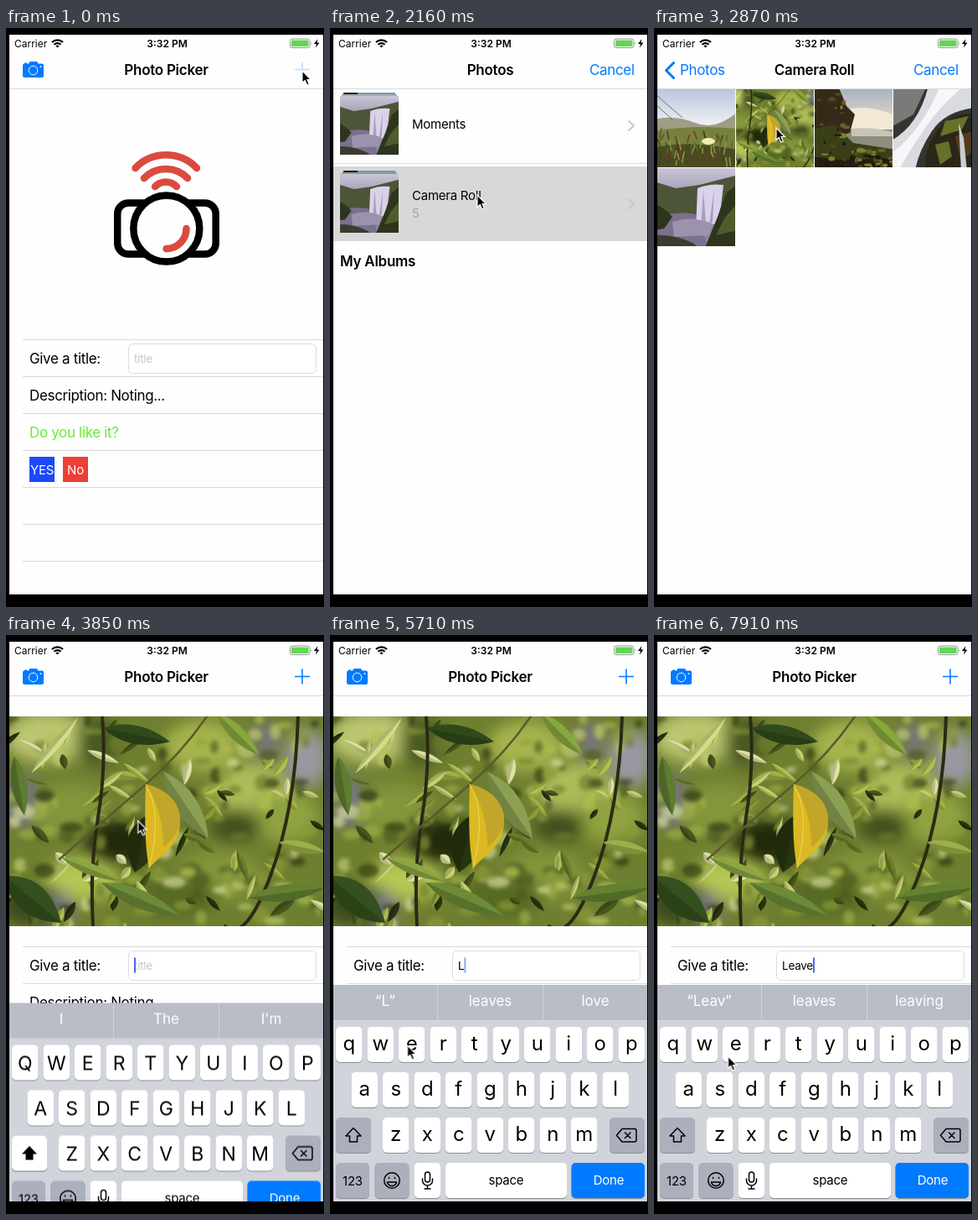
An HTML page for the animation above (8 s loop, 380 by 690 pixels).

```html
<!DOCTYPE html>
<html lang="en">
<head>
<meta charset="utf-8">
<title>Photo Picker</title>
<style>
html, body { margin: 0; width: 100%; height: 100%; overflow: hidden; background: #000; }
svg { display: block; }
text { font: 17px Inter, Roboto, sans-serif; letter-spacing: -.34px; }
.b { font-weight: 600; letter-spacing: -.27px; }
.s { font-size: 15px; letter-spacing: -.24px; }
.mid { text-anchor: middle; }
.blue { fill: #007aff; }
.line { stroke: #d9d9dc; }
.field { font-size: 13.5px; letter-spacing: -.25px; }
.status { font-size: 12px; letter-spacing: 0; }
.hint { fill: #fff; letter-spacing: 0; }
.key { font-size: 23px; letter-spacing: 0; }
.stroke { fill: none; stroke-linecap: round; stroke-linejoin: round; }
</style>
</head>
<body>
<svg width="380" height="690" viewBox="0 0 380 690">
  <defs>
    <clipPath id="screen"><path d="M4 8H379V675H4z"/></clipPath>
    <filter id="soft" x="-10%" y="-10%" width="120%" height="120%"><feGaussianBlur stdDeviation="9"/></filter>
    <filter id="blur" x="-10%" y="-10%" width="120%" height="120%"><feGaussianBlur stdDeviation="2.5"/></filter>
    <filter id="haze" x="-10%" y="-10%" width="120%" height="120%"><feGaussianBlur stdDeviation=".6"/></filter>
    <linearGradient id="sky" x2="0" y2="1"><stop stop-color="#b9c6dc"/><stop offset=".45" stop-color="#eef0f2"/></linearGradient>
    <linearGradient id="dusk" x2="0" y2="1"><stop stop-color="#c9c6d6"/><stop offset=".5" stop-color="#8d84a0"/></linearGradient>
    <linearGradient id="glow" x2="0" y2="1"><stop stop-color="#a9b3c4"/><stop offset=".5" stop-color="#f0dfc6"/></linearGradient>

    <g id="leafy"></g>
    <g id="dune">
      <path fill="url(#sky)" d="M0 0H93V93H0z"/>
      <g filter="url(#haze)">
        <path fill="#a09c86" d="M-4 36Q20 30 45 40T97 26V97H-4z"/>
        <path fill="#77803f" d="M-4 50Q40 42 97 47V97H-4z"/>
        <path fill="#4a4a22" d="M-4 70Q30 60 97 72V97H-4z"/>
      </g>
      <path stroke="#555" stroke-width=".8" d="M0 8L30 34M0 20L18 36"/>
      <g id="blades"></g>
      <ellipse cx="61" cy="62" rx="8" ry="4" fill="#f0efac"/>
    </g>
    <g id="coast">
      <path fill="url(#glow)" d="M0 0H93V93H0z"/>
      <g filter="url(#haze)">
        <path fill="#f3e8d6" d="M40 24Q62 18 93 30V52H46z"/>
        <path fill="#8f8c80" d="M38 48H97V74H30z"/>
        <path fill="#c9c3b4" d="M44 47Q70 44 97 52V56H44z"/>
        <path fill="#37291a" d="M-4-4H28L38 20 48 30 42 52-4 66z"/>
        <path fill="#3b3f18" d="M-4 48L24 42 46 64 97 72V97H-4z"/>
        <path fill="#241d12" d="M-4 80L30 84 97 82V97H-4z"/>
        <g id="moss"></g>
      </g>
    </g>
    <g id="rapids">
      <path fill="#36342f" d="M0 0H93V93H0z"/>
      <g filter="url(#haze)">
        <path fill="#7b7a78" d="M-4-4H40L24 30-4 46z"/>
        <path fill="#d9dbe0" d="M42-4H97V22Q62 26 46 50T26 97H-4V62Q30 44 42-4z"/>
        <path fill="#f7f7fa" d="M56-4H84Q56 20 38 46T6 97H-4V78Q34 50 56-4z"/>
        <path fill="#2a2718" d="M97 28Q64 30 50 52T38 97H97z"/>
        <path fill="#68702a" d="M62 38L90 32 82 48 56 56zM50 66l16-4 4 18-14 10z"/>
        <path fill="#513c20" d="M74 56l20-6v26l-14 8z"/>
        <path fill="#c9cdd4" d="M78 40l6 18 4 39h-7z"/>
      </g>
    </g>
    <g id="falls">
      <path fill="url(#dusk)" d="M0 0H93V93H0z"/>
      <g filter="url(#haze)">
        <path fill="#4d5538" d="M-4 16L22 24 50 20 97 8V50L60 60-4 66z"/>
        <path fill="#7b708d" d="M-4 58Q30 50 50 56L60 97H-4z"/>
        <path fill="#d9d2ea" d="M48 24Q62 18 79 20L76 46 70 66 46 72z"/>
        <path fill="#a99fbd" d="M55 26l3 40-6 4zM68 24l-2 40-4 3z"/>
        <path fill="#9c92ae" d="M18 64Q40 56 66 66L62 80 20 82z"/>
        <path fill="#2d351c" d="M97 18L82 30 72 58 56 97H97zM-4 42Q10 48 18 58L8 72-4 74z"/>
        <path fill="#4f5c2c" d="M97 40L80 60 70 80 97 74z"/>
        <path fill="#3c3b31" d="M-4 80Q20 78 44 90L50 97H-4z"/>
      </g>
    </g>
  </defs>

  <g clip-path="url(#screen)">
    <path fill="#fefefe" d="M4 8H379V675H4z"/>
    <g id="page">
      <path class="line" stroke="#c8c8cb" d="M4 72.5H379"/>
      <path class="blue" d="M22 42.500v-1h3v1h2l1.500-2.500h8.500l1.500 2.500H43q2 0 2 2V57q0 2-2 2H22q-2 0-2-2V44.500q0-2 2-2z"/>
      <circle cx="32.500" cy="50.500" r="5.300" fill="none" stroke="#fff"/>
      <circle cx="41.500" cy="46" r=".9" fill="#fff"/>
      <text class="b mid" x="191.500" y="56">Photo Picker</text>
      <path id="plus" stroke="#007aff" stroke-width="1.600" d="M345 49.500H363M354 40.500V58.500"/>
      <g id="art" class="stroke" stroke-width="8.500">
        <g stroke="#db4a3f">
          <path d="M154.500 167A51 51 0 0 1 228 167"/>
          <path d="M165 179A36 36 0 0 1 217 179"/>
          <path d="M178 189A18 18 0 0 1 204 189"/>
        </g>
        <rect x="133.200" y="208.500" width="117.500" height="61" rx="13" stroke="#000"/>
        <circle cx="191.800" cy="239" r="39.500" fill="#fefefe" stroke="#000"/>
        <path stroke="#db4a3f" d="M215.500 239A24 24 0 0 1 191.500 263"/>
      </g>
      <svg id="photo" x="4" y="97" width="375" height="250" viewBox="0 0 375 250"><use href="#leafy"/></svg>
      <path class="line" d="M20 371.500H379M20 415.500H379M20 459.500H379M20 503.500H379M20 547.500H379M20 591.500H379M20 635.500H379"/>
      <text x="28" y="400">Give a title:</text>
      <rect x="146.500" y="376.500" width="224" height="35" rx="5" fill="#fff" stroke="#dcdcdc"/>
      <text id="placeholder" class="field" x="153" y="399" fill="#c7c7cd">title</text>
      <g id="typing"></g>
      <text x="28" y="444">Description: Noting...</text>
      <text x="28" y="488" fill="#66ee2e">Do you like it?</text>
      <path fill="#1c48fa" d="M28 511h30v30H28z"/>
      <path fill="#ec3f35" d="M68 511h30v30H68z"/>
      <text class="s mid" x="43" y="531.500" fill="#fff">YES</text>
      <text class="s mid" x="83" y="531.500" fill="#fff">No</text>
    </g>

    <g id="modal">
      <path fill="#fefefe" d="M4 8H379V675H4z"/>
      <g id="albums">
        <path id="pressed" fill="#d8d8d8" d="M4 165H379V254H4z"/>
        <path class="line" d="M4 161.500H379"/>
        <g id="stacks"></g>
        <text class="s" x="98" y="120">Moments</text>
        <text class="s" x="98" y="205">Camera Roll</text>
        <text class="s" x="98" y="226" fill="#a3a3a8">5</text>
        <path class="stroke" stroke="#c4c4c9" stroke-width="1.800" d="M357 111l6 5.500-6 5.500M357 204l6 5.500-6 5.500"/>
        <text class="b" x="12" y="284">My Albums</text>
      </g>
      <g id="grid">
        <path fill="#fefefe" d="M4 72H379V675H4z"/>
        <g id="thumbs"></g>
      </g>
      <path fill="#fefefe" d="M4 8H379V72H4z"/>
      <path class="line" d="M4 72.500H379"/>
      <text id="albumsTitle" class="b mid" x="191.500" y="56">Photos</text>
      <text id="gridTitle" class="b mid" x="191.500" y="56">Camera Roll</text>
      <g id="back">
        <path class="stroke" stroke="#007aff" stroke-width="3" d="M23.500 41.500L14.500 50.500 23.500 59.500"/>
        <text class="blue" x="31" y="56">Photos</text>
      </g>
      <text class="blue" x="310" y="56">Cancel</text>
    </g>

    <g id="keyboard">
      <path fill="#d1d4db" d="M4 417H379V675H4z"/>
      <path fill="#b8bdc6" d="M4 417H379V459H4z"/>
      <path stroke="#d1d4db" d="M128.500 417V459M254.500 417V459"/>
      <g id="hints"></g>
      <g id="caps"></g>
      <g id="upper"></g>
      <g id="lower"></g>
      <g class="stroke" stroke="#000" stroke-width="1.500">
        <path d="M349 588.500H364q2 0 2 2V602q0 2-2 2H349L342.500 596.300zM352.500 593l6.500 6.500M359 593l-6.500 6.500"/>
        <circle cx="74" cy="650" r="9.300"/>
        <path d="M68.500 652H79.500Q78.500 656.500 74 656.500T68.500 652zM70.500 646.500v1M77.500 646.500v1"/>
        <rect x="113.500" y="640" width="6" height="12" rx="3"/>
        <path d="M110.500 648v2a6 6 0 0 0 12 0v-2M116.500 656.500v3.500M113 660h7"/>
      </g>
      <text class="s mid" x="27" y="655.500">123</text>
      <text class="s mid" x="210.500" y="655">space</text>
      <text class="s mid" x="333" y="655" fill="#fff">Done</text>
      <g id="pops"></g>
    </g>

    <g id="statusBar">
      <text class="status" x="10" y="22.500">Carrier</text>
      <path fill="none" stroke="#000" stroke-width="2.200" d="M55 17a9.200 9.200 0 0 1 13 0M57.500 19.700a5.700 5.700 0 0 1 8 0"/>
      <path d="M59.300 21.300q2.200-1.800 4.400 0L61.500 23.500z"/>
      <text class="status b mid" x="192.500" y="22.500">3:32 PM</text>
      <rect x="339.500" y="13" width="23.500" height="10.500" rx="2.500" fill="none" stroke="#8f9a8f"/>
      <rect x="341" y="14.500" width="20.500" height="7.500" rx="1.300" fill="#62d753"/>
      <path fill="#8f9a8f" d="M364 16.500q1.600 1.800 0 3.600z"/>
      <path d="M372.500 13l-4.500 6h3l-1 4.500 4.500-6h-3z"/>
    </g>
  </g>
  <path id="cursor" fill="#000" stroke="#fff" stroke-width="1.200" d="M0 0V14.500L3.300 11.500 5.700 17 8.300 15.900 6 10.500H10.300z"/>
</svg>
<script>
const LOOP = 8000;
const $ = id => document.getElementById(id);
const add = (id, markup) => $(id).insertAdjacentHTML('beforeend', markup);

// ---- photos ----
let seed = 11;
const rnd = (a, b) => {
  seed = (seed * 16807) % 2147483647;
  return a + (b - a) * seed / 2147483647;
};
const pick = list => list[Math.floor(rnd(0, list.length))];
const blob = (x, y, rx, ry, color, more = '') =>
  `<ellipse cx="${x}" cy="${y}" rx="${rx}" ry="${ry}" fill="${color}" ${more}/>`;

function leaf(x1, y1, x2, y2, w, color) {
  const len = Math.hypot(x2 - x1, y2 - y1);
  const nx = (y1 - y2) / len * w, ny = (x2 - x1) / len * w;
  const mx = x1 * .55 + x2 * .45, my = y1 * .55 + y2 * .45;
  const side = k => `Q${mx + nx * k} ${my + ny * k}`;
  return `<path fill="${color}" d="M${x1} ${y1}${side(1)} ${x2} ${y2}${side(-1)} ${x1} ${y1}"/>
    <path fill="#000" opacity=".18" d="M${x1} ${y1}${side(1)} ${x2} ${y2}z"/>`;
}

function foliage() {
  const greens = ['#9fb045', '#c6d070', '#48571c', '#6b7d2a', '#2a340f', '#b3c04f', '#8a9c38', '#dde2a0'];
  const patches = [
    [45, 25, 50, 30, '#bcc670'], [14, 100, 26, 32, '#74747b'], [75, 110, 45, 30, '#82963a'],
    [105, 30, 25, 30, '#4a5a20'], [130, 150, 42, 30, '#222c0d'], [230, 35, 45, 30, '#a6b44d'],
    [290, 90, 45, 35, '#adbb58'], [355, 50, 26, 34, '#9998a2'], [330, 120, 40, 30, '#8fa340'],
    [250, 190, 50, 30, '#82953a'], [200, 215, 50, 25, '#566a20'], [85, 195, 45, 25, '#b5c752'],
    [30, 225, 45, 25, '#3a4c1c'], [62, 228, 16, 20, '#77767c'], [340, 215, 45, 30, '#6c8030'],
    [305, 30, 16, 24, '#77757f'], [270, 130, 30, 20, '#434f1c']
  ];
  let out = '<path fill="#6f7f30" d="M0 0H375V250H0z"/><g filter="url(#soft)">';
  for (const p of patches) out += blob(...p);
  out += '</g><g filter="url(#blur)" opacity=".65">';
  for (let i = 0; i < 150; i++)
    out += blob(rnd(0, 375), rnd(0, 250), rnd(3, 14), rnd(3, 10), pick(greens));
  out += '</g>';
  for (let i = 0; i < 75; i++) {
    const x = rnd(0, 375), y = rnd(0, 250), a = rnd(.2, 2.9), l = rnd(14, 42);
    out += leaf(x, y, x + l * Math.cos(a), y + l * Math.sin(a), rnd(5, 11), pick(greens));
  }
  out += `<g class="stroke" stroke="#2c2a16" stroke-width="4">
    <path d="M111 0Q116 60 106 120T100 250M345 0Q342 110 312 190T258 250"/>
    <path stroke="#5c5a2a" stroke-width="2.500" d="M236 0Q205 45 163 81T60 170"/></g>`;
  const leaves = [
    [6, 48, 18, 118, 19, '#5f7d30'], [82, 2, 26, 68, 11, '#d3dd86'], [112, 14, 192, 30, 22, '#304a1b'],
    [184, 66, 238, 146, 28, '#8ba052'], [248, -4, 298, 46, 17, '#87a83d'], [168, 116, 150, 186, 36, '#27350f'],
    [-6, 190, 62, 246, 36, '#34501f'], [62, 168, 132, 196, 14, '#8ba544'], [110, 198, 204, 238, 22, '#6b8b38'],
    [286, 216, 378, 204, 20, '#63812f'], [322, 150, 378, 162, 14, '#9bb04a']
  ];
  for (const l of leaves) out += leaf(...l);
  return out + `<path fill="#dcb922" d="M163 81C186 86 206 102 204 128C201 156 184 162 167 181C161 150 162 112 163 81z"/>
    <path fill="#c2a62b" d="M163 81C186 86 206 102 204 128C201 140 192 150 184 156Q184 112 163 81z"/>
    <path class="stroke" stroke="#efd75a" d="M163 81Q184 115 167 180"/>`;
}
$('leafy').innerHTML = foliage();

for (let i = 0; i < 60; i++) {
  const x = rnd(0, 93), y = rnd(58, 93);
  add('blades', `<path stroke="${pick(['#8b9a3f', '#3c451c', '#7a3a2c', '#59672a'])}" stroke-width="1.500" d="M${x} ${y}l${rnd(-4, 4)} ${rnd(-14, -6)}"/>`);
}
for (let i = 0; i < 70; i++) {
  const x = rnd(0, 93), top = x < 40 ? 4 : 72;
  add('moss', blob(x, rnd(top, 93), rnd(1, 5), rnd(1, 3), pick(['#75832b', '#6f5a2a', '#1f1a10', '#4d4a1c'])));
}

const picture = (name, x, y, size, box = '0 0 93 93') =>
  `<svg x="${x}" y="${y}" width="${size}" height="${size}" viewBox="${box}"><use href="#${name}"/></svg>`;
['dune', 'leafy', 'coast', 'rapids', 'falls'].forEach((name, i) =>
  add('thumbs', picture(name, 4 + i % 4 * 94, 73 + (i >> 2) * 94, 93, name === 'leafy' ? '62.5 0 250 250' : undefined)));
for (const y of [81, 174])
  add('stacks', `<path fill="#1d1d1d" d="M16 ${y - 4}h17v2h-17z"/><path fill="#6f9cc4" d="M33 ${y - 4}h45v2h-45z"/>
    <path fill="#55564c" d="M14 ${y - 1.5}h66v1h-66z"/>` + picture('falls', 12, y, 70));

// ---- keyboard ----
const GREY = '#abb0bc', PITCH = 37.5;
const rows = [['qwertyuiop', 22.75, 467], ['asdfghjkl', 41.25, 521], ['zxcvbnm', 78.75, 575]];
const cap = (x, y, w, color = '#fff') => {
  const rect = (top, fill) => `<rect x="${x}" y="${top}" width="${w}" height="42" rx="5" fill="${fill}"/>`;
  return rect(y + 1, '#8b8e95') + rect(y, color);
};
const label = (x, y, s, cls = 'key', size = '') => `<text class="${cls} mid" x="${x}" y="${y}" ${size}>${s}</text>`;
const spot = {};
for (const [letters, x0, y] of rows)
  [...letters].forEach((ch, i) => {
    const x = x0 + i * PITCH;
    spot[ch] = [x, y];
    add('caps', cap(x - 15.75, y, 31.5));
    add('upper', label(x, y + 29.5, ch.toUpperCase()));
    add('lower', label(x, y + 28, ch, 'key', 'style="font-size:24px"'));
  });
add('caps', cap(7, 575, 42, GREY) + cap(334, 575, 42, GREY) + cap(7, 629, 40, GREY) + cap(53.5, 629, 41, GREY)
  + cap(100.5, 629, 31.5) + cap(138, 629, 145) + cap(288.5, 629, 87.5, '#007aff'));
const arrow = 'd="M28 587.500L37 597H32.500V604H23.500V597H19z"';
add('upper', cap(7, 575, 42) + `<path ${arrow}/>`);
add('lower', `<path class="stroke" stroke="#000" stroke-width="1.500" ${arrow}/>`);

function balloon(id, ch) {
  const [x, y] = spot[ch.toLowerCase()];
  add('pops', `<g id="${id}"><path fill="#fff" stroke="#b4b7bd" stroke-width=".6" d="M${x - 16} ${y + 37}V${y + 8}
    C${x - 16} ${y - 4} ${x - 33} ${y - 2} ${x - 33} ${y - 14}V${y - 48}q0-9 9-9h48q9 0 9 9V${y - 14}
    C${x + 33} ${y - 2} ${x + 16} ${y - 4} ${x + 16} ${y + 8}V${y + 37}q0 5-5 5h-22q-5 0-5-5z"/>`
    + label(x, y - 17, ch, 'key', 'style="font-size:34px"') + '</g>');
}

// ---- timeline: stops are [ms, declarations] ----
let css = '';
function animate(selector, stops, ease = 'linear') {
  const name = 'k-' + selector.slice(1);
  const all = [[0, stops[0][1]], ...stops, [LOOP, stops.at(-1)[1]]];
  css += `@keyframes ${name}{${all.map(([ms, rule]) => `${ms / LOOP * 100}%{${rule}}`).join('')}}
    ${selector}{animation:${name} ${LOOP}ms ${ease} infinite}`;
}
const show = (id, from, to) => animate('#' + id,
  [[0, `opacity:${from ? 0 : 1}`], [from, 'opacity:1'], [to, 'opacity:0']], 'step-end');
const at = (x, y) => `transform:translate(${x}px,${y}px)`;
const SPRING = 'cubic-bezier(.1,.6,.2,1)';

[['L', 4930, 5190], ['e', 5890, 6060], ['a', 6420, 6510], ['v', 6940, 7030], ['e', 7740, 7830]].forEach(([ch, from, to], i) => {
  balloon('pop' + i, ch);
  show('pop' + i, from, to);
});

const typed = [[3500, ''], [5190, 'L'], [6060, 'Le'], [6510, 'Lea'], [7030, 'Leav'], [7830, 'Leave']];
typed.forEach(([from, word], i) => {
  const id = 'typed' + i;
  add('typing', `<g id="${id}"><text class="field" x="153" y="399">${word}</text></g>`);
  const x = 153 + $(id).firstChild.getComputedTextLength();
  add(id, `<rect class="caret" x="${x}" y="384.500" width="2" height="18" fill="#426bf2"/>`);
  show(id, from, typed[i + 1]?.[0] ?? LOOP);
});

const hints = [[0, 'I', 'The', "I'm"], [5190, '“L”', 'leaves', 'love'], [6150, '“Le”', 'leaves', 'lets'],
  [6600, '“Lea”', 'leaves', 'leading'], [7120, '“Leav”', 'leaves', 'leaving']];
hints.forEach(([from, ...words], i) => {
  const id = 'hint' + i;
  add('hints', `<g id="${id}">${words.map((w, n) => label(66 + n * 125.5, 442, w, 'hint')).join('')}</g>`);
  show(id, from, hints[i + 1]?.[0] ?? LOOP);
});

show('art', 0, 3500);
show('photo', 3500, LOOP);
show('placeholder', 0, 5190);
show('upper', 0, 5190);
show('lower', 5190, LOOP);
show('pressed', 2160, 3900);

animate('#plus', [[270, 'opacity:.25'], [500, 'opacity:1']]);
animate('#modal', [[1250, at(0, 667)], [1700, at(0, 0)], [3500, at(0, 0)], [3880, at(0, 667)]], SPRING);
animate('#albums', [[2250, at(0, 0)], [2700, at(-112, 0)]], SPRING);
animate('#grid', [[2250, at(375, 0)], [2700, at(0, 0)]], SPRING);
animate('#albumsTitle', [[2250, at(0, 0) + ';opacity:1'], [2700, at(-133, 0) + ';opacity:0']], SPRING);
animate('#gridTitle', [[2250, at(180, 0) + ';opacity:0'], [2700, at(0, 0) + ';opacity:1']], SPRING);
animate('#back', [[2250, at(133, 0) + ';opacity:0'], [2700, at(0, 0) + ';opacity:1']], SPRING);
animate('#keyboard', [[3605, at(0, 258)], [4105, at(0, 0)]], SPRING);

animate('.caret', [[4390, 1], [4520, 0], [4840, 0], [4960, 1], [5650, 1], [5800, 0], [5900, 0], [5970, 1],
  [7440, 1], [7550, 0], [7740, 0], [7820, 1]].map(([ms, v]) => [ms, `opacity:${v}`]));

animate('#cursor', [
  [270, 354, 51], [700, 330, 79], [1350, 330, 79], [1870, 176, 199], [2250, 176, 199], [2850, 146, 119],
  [3590, 146, 119], [3850, 157.5, 221], [4300, 250, 400], [4390, 250, 400], [4900, 342, 547], [5240, 342, 547],
  [5680, 92.5, 489], [6130, 92.5, 489], [6400, 36, 545], [6520, 36, 545], [6850, 188, 581], [7040, 188, 581],
  [7540, 88.5, 502]
].map(([ms, x, y]) => [ms, at(x, y)]));

document.head.insertAdjacentHTML('beforeend', `<style>${css}</style>`);
</script>
</body>
</html>
```
